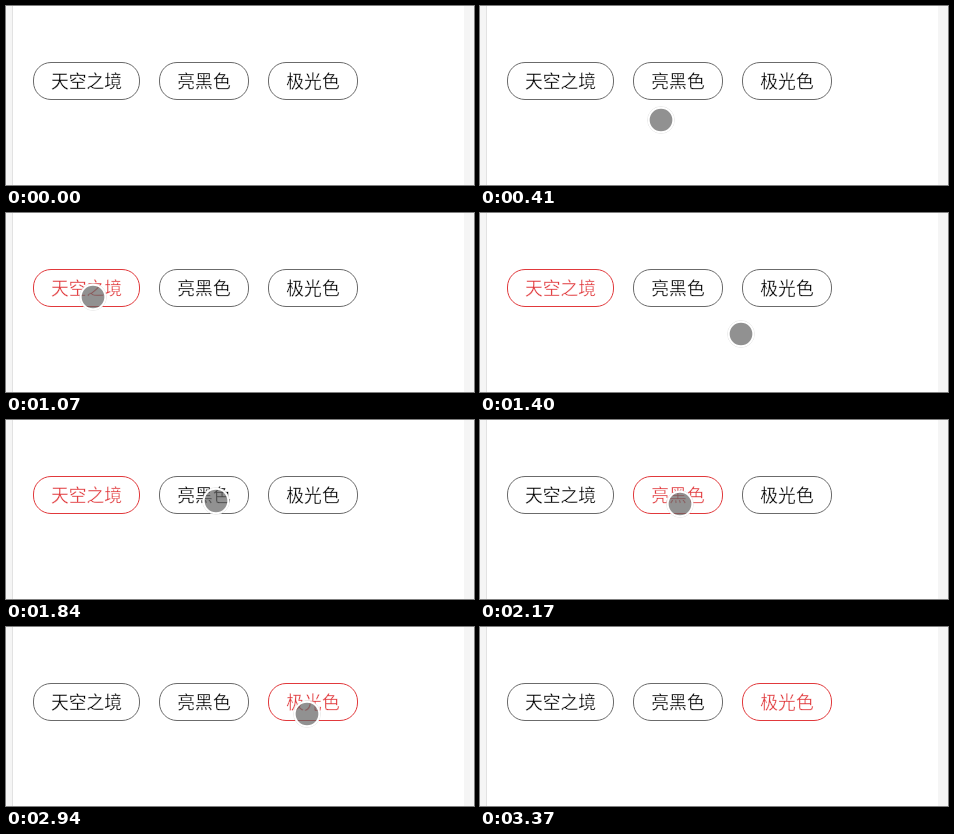
Animation of 468x179 px, one loop 4.24 s. Source, as an HTML page:

```html
<!DOCTYPE html>
<html lang="zh-CN">
<head>
<meta charset="utf-8">
<title>Colour choice</title>
<style>
  html, body { margin: 0; width: 100%; height: 100%; overflow: hidden; background: #fff; }
  svg { display: block; }
  .pill rect { fill: #fff; stroke: #6b6b6b; }
  /* the white stroke thins the glyphs */
  .pill text {
    font: 300 17.8px "Noto Sans CJK SC", "Noto Sans CJK", sans-serif;
    fill: #000;
    stroke: #fff;
    stroke-width: .3;
    text-anchor: middle;
  }
  .pill.on rect { stroke: #e1393c; }
  .pill.on text { fill: #e1393c; }
</style>
</head>
<body>
<svg width="468" height="179" viewBox="0 0 468 179">
  <rect width="468" height="179" fill="#fff"/>
  <rect width="6" height="179" fill="#f5f5f5"/>
  <rect x="6" width="1" height="179" fill="#e2e2e2"/>
  <rect x="458" width="10" height="179" fill="#f5f5f5"/>
  <g id="pills"></g>
  <g id="touch">
    <circle r="13.4" fill="none" stroke="#dcdcdc" stroke-width=".7"/>
    <circle r="12.3" fill="#646464" fill-opacity=".71" stroke="#fff" stroke-width="1.9"/>
  </g>
</svg>
<script>
const LOOP = 4240, ENTER = 300, LEAVE = 3260, GONE = 3370, STEP = 110;
const SVG = 'http://www.w3.org/2000/svg';
const labels = ['天空之境', '亮黑色', '极光色'];
const taps = [6, 16, 23];

// pointer key points: step, x, y
const path = [
  [0, 237, 127], [3, 69, 88], [4, 87, 83], [7, 87, 84],
  [9, 181, 113], [10, 261, 121], [11, 298, 110], [13, 230, 75], [14, 210, 81],
  [16, 200, 84], [17, 200, 84], [19, 256, 103], [22, 301, 87]
];
const exit = [381, 139];

function add(parent, name, attrs) {
  const el = document.createElementNS(SVG, name);
  for (const key in attrs) el.setAttribute(key, attrs[key]);
  return parent.appendChild(el);
}

const touch = document.getElementById('touch');
let left = 27;
const pills = labels.map(label => {
  const width = Math.round(17.7 * label.length + 36.6);
  const pill = add(document.getElementById('pills'), 'g', { class: 'pill' });
  add(pill, 'rect', { x: left + .5, y: 56.5, width: width - 1, height: 37, rx: 17.5 });
  add(pill, 'text', { x: left + width / 2, y: 81.6 }).textContent = label;
  left += width + 19;
  return pill;
});

function pointAt(step) {
  const next = path.findIndex(point => point[0] > step);
  if (next < 0) return path.at(-1).slice(1);
  const [s0, x0, y0] = path[next - 1];
  const [s1, x1, y1] = path[next];
  const k = (step - s0) / (s1 - s0);
  return [x0 + (x1 - x0) * k, y0 + (y1 - y0) * k];
}

function draw(t) {
  const step = Math.floor((t - ENTER) / STEP);
  const chosen = taps.filter(tap => tap <= step).length - 1;
  pills.forEach((pill, i) => pill.classList.toggle('on', i === chosen));

  const visible = t >= ENTER && t < GONE;
  touch.style.display = visible ? '' : 'none';
  if (!visible) return;
  const [x, y] = t < LEAVE ? pointAt(step) : exit;
  touch.setAttribute('transform', `translate(${x} ${y})`);
}

const start = performance.now();
function tick() {
  draw((performance.now() - start) % LOOP);
  requestAnimationFrame(tick);
}
draw(0);
requestAnimationFrame(tick);
</script>
</body>
</html>
```
